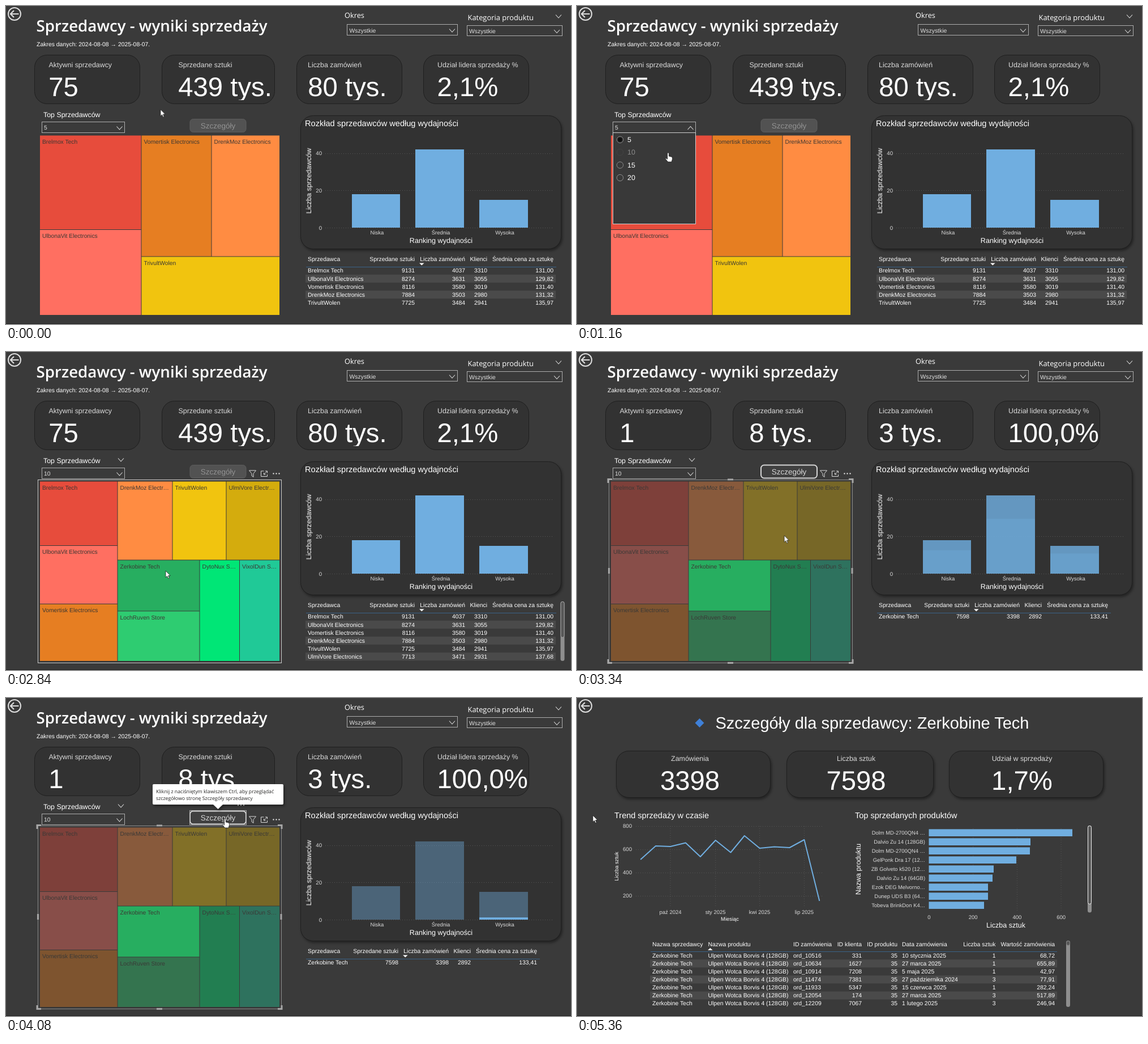
Write an HTML page that moves like this. It is 998 px wide and 561 px high and loops after 5.57 s.

```html
<!DOCTYPE html>
<html lang="pl">
<head>
<meta charset="utf-8">
<title>Sprzedawcy - wyniki sprzedaży</title>
<style>
html, body { margin: 0; width: 100%; height: 100%; overflow: hidden; background: #3a3a3a; }
svg { display: block; width: 998px; height: 561px; font-family: "Liberation Sans", Arial, sans-serif; text-rendering: geometricPrecision; }
.ui { font-family: "Open Sans", "Noto Sans", sans-serif; }
.shadow { filter: drop-shadow(2px 3px 2px rgba(0, 0, 0, .4)); }
.lit { transform-box: fill-box; transform-origin: 50% 100%; }
</style>
</head>
<body>
<script>
const LOOP = 5570;
const BLUE = '#70aee0', SOFT = '#dadada', WHITE = '#fff';

// ---- drawing helpers ----
const text = (x, y, s, size, fill = WHITE, anchor = 'start', extra = '') =>
  `<text x="${x}" y="${y}" font-size="${size}" fill="${fill}" text-anchor="${anchor}" ${extra}>${s}</text>`;
const mid = (x, y, s, size, fill) => text(x, y, s, size, fill, 'middle');
const end = (x, y, s, size, fill) => text(x, y, s, size, fill, 'end');
const upright = (x, y, s, size) =>
  text(0, 0, s, size, WHITE, 'middle', `transform="translate(${x} ${y}) rotate(-90)"`);
const rect = (x, y, w, h, fill, extra = '') =>
  `<rect x="${x}" y="${y}" width="${w}" height="${h}" fill="${fill}" ${extra}/>`;
const frame = (x1, y1, x2, y2, stroke, extra = '') =>
  rect(x1 + .5, y1 + .5, x2 - x1 - 1, y2 - y1 - 1, 'none', `stroke="${stroke}" ${extra}`);
const line = (d, stroke, width = 1, extra = '') =>
  `<path d="${d}" fill="none" stroke="${stroke}" stroke-width="${width}" ${extra}/>`;
const dots = d => line(d, '#565656', 1, 'stroke-dasharray="1 3"');
const group = (id, ...parts) => `<g id="${id}">${parts.join('')}</g>`;
const card = (x1, y1, x2, y2, cls = '') =>
  rect(x1 + .5, y1 + .5, x2 - x1 - 1, y2 - y1 - 1, '#323232', `rx="22" stroke="#1f1f1f" class="${cls}"`);
const chevron = (x, y, up) =>
  line(up ? `M${x - 5} ${y + 3}l5 -5.5l5 5.5` : `M${x - 5} ${y - 2.5}l5 5.5l5 -5.5`, SOFT, 1.1);
const ellipsis = (x, y) => [-5, 0, 5].map(d => `<circle cx="${x + d}" cy="${y}" r="1.2" fill="${SOFT}"/>`).join('');
const tools = (x, y) =>
  line(`M${x - 6} ${y - 5.5}h12l-4.5 5.5v6l-3 -2.2v-3.8z`, SOFT) +
  line(`M${x + 20} ${y - 4.5}h-5v9.5h11v-3.5M${x + 22.5} ${y - 4.5}h3.5v3.5m0 -3.5l-6 6m0 -3v3h3`, SOFT) +
  ellipsis(x + 42, y);
const scroll = (x, y, h, thumb, edge, id = '') =>
  rect(x, y, 7, h, '#8f8f8f', 'rx="3.5"') +
  rect(x + .5, y + .5, 6, thumb, '#575757', `rx="3" stroke="${edge}" id="${id}"`);
const tile = (x, y, x2, y2, fill, name) =>
  rect(x, y, x2 - x, y2 - y, fill) + text(x + 4, y + 14, name, 10.3, '#3c3833');

// cols: [x, anchor, header]
function table(cols, rows, headY, rowY, step, x1, x2) {
  const cells = (vals, y) => vals.map((v, i) => text(cols[i][0], y, v, 10.4, WHITE, cols[i][1])).join('');
  return cells(cols.map(c => c[2]), headY) +
    rows.map((r, i) => (i % 2 ? rect(x1, rowY + i * step - 10.6, x2 - x1, step, '#4a4a4a') : '') +
      cells(r, rowY + i * step)).join('');
}

// ---- seller overview ----
const sellers = [
  ['Brelmox Tech', '9131', '4037', '3310', '131,00'],
  ['UlbonaVit Electronics', '8274', '3631', '3055', '129,82'],
  ['Vomertisk Electronics', '8116', '3580', '3019', '131,40'],
  ['DrenkMoz Electronics', '7884', '3503', '2980', '131,32'],
  ['TrivultWolen', '7725', '3484', '2941', '135,97']
];
const sixth = ['UlmiVore Electronics', '7713', '3471', '2931', '137,68'];
const picked = 'Zerkobine Tech';
const sellerCols = dx => [
  [533, 'start', 'Sprzedawca'], [722 + dx, 'end', 'Sprzedane sztuki'], [811 + dx, 'end', 'Liczba zamówień'],
  [850 + dx, 'end', 'Klienci'], [967 + dx, 'end', 'Średnia cena za sztukę']
];
const sellerTable = (rows, dx) => table(sellerCols(dx), rows, 449.8, 470.4, 14.1, 529, 971) +
  line(`M530 460.5H${972 + dx}`, '#3a6288') +
  `<path d="M${730 + dx} 453.5h8.6l-4.3 4z" fill="${WHITE}"/>`;

const cardX = [[50, 237], [275, 475], [513, 700], [737, 924]];
const labels = ['Aktywni sprzedawcy', 'Sprzedane sztuki', 'Liczba zamówień', 'Udział lidera sprzedaży %'];
const labelX = [75.5, 304.5, 533, 762], valueX = [75.2, 304.2, 533.3, 761.5];
const values = list => `<g clip-path="url(#cut)">${list.map((v, i) => text(valueX[i], 159.3, v, 47.3)).join('')}</g>`;

const bars = [[611, 696, 332, 'Niska', 655.5], [723, 809, 253, 'Średnia', 768], [836, 922, 342, 'Wysoka', 881]];
const barSet = cls => bars.map(([a, b, y]) => rect(a, y, b - a, 391 - y, BLUE, `class="${cls}"`)).join('');

const red = '#e74c3c', coral = '#ff6f61', amber = '#e67e22', peach = '#ff8c42', gold = '#f1c40f';
const topFive = [
  [60, 228.5, 238.5, 394, red, sellers[0][0]], [60, 395, 238.5, 545, coral, sellers[1][0]],
  [239.5, 228.5, 362.5, 441.5, amber, sellers[2][0]], [363.5, 228.5, 483, 441.5, peach, sellers[3][0]],
  [239.5, 442.5, 483, 545, gold, sellers[4][0]]
];
const topTen = [
  [60, 228.5, 196.5, 341, red, sellers[0][0]], [60, 342, 196.5, 444, coral, sellers[1][0]],
  [60, 445, 196.5, 545, amber, sellers[2][0]], [197.5, 228.5, 293.5, 366.5, peach, 'DrenkMoz Electr…'],
  [294.5, 228.5, 388.5, 366.5, gold, sellers[4][0]], [389.5, 228.5, 483, 366.5, '#d4ac0d', 'UlmiVore Electr…'],
  [197.5, 457.5, 341.5, 545, '#2ecc71', 'LochRuven Store'], [342.5, 367.5, 412, 545, '#00e676', 'DytoNux S…'],
  [413, 367.5, 483, 545, '#20c997', 'VixolDun S…']
];
const tiles = list => list.map(t => tile(...t)).join('');

const radio = (y, on) => `<circle cx="76" cy="${y}" r="5.7" fill="${on ? '#242424' : 'none'}" stroke="#8c8c8c"/>` +
  (on ? `<circle cx="76" cy="${y}" r="3.4" fill="#111"/>` : '');
const option = (y, s, on) => radio(y, on) + text(89, y + 4.4, s, 12.4);
const button = (fill, edge, width, ink) =>
  rect(325, 199.5, 99, 23, fill, `rx="5.5" stroke="${edge}" stroke-width="${width}"`) + mid(374.5, 216, 'Szczegóły', 13.5, ink);
const grips = line('M55 231V224.5H62M480 224.5H487V231M487 542V548.5H480M62 548.5H55V542', '#a6a6a6', 3) +
  line('M266 225H276M266 548.5H276M56.5 381V391M486 381V391', '#a6a6a6', 3);

const overview = group('overview',
  text(53.5, 45.3, 'Sprzedawcy - wyniki sprzedaży', 27.7, WHITE, 'start', 'class="ui" font-weight="600"'),
  text(54, 71, 'Zakres danych: 2024-08-08 → 2025-08-07.', 10.45),
  text(598, 21, 'Okres', 12.8, WHITE, 'start', 'class="ui"'),
  text(815.5, 25, 'Kategoria produktu', 12.9, WHITE, 'start', 'class="ui"'),
  frame(602, 32, 798, 52, '#adadad'), text(606.5, 46.5, 'Wszystkie', 10.4, '#e0e0e0'), chevron(788, 43),
  frame(814, 34, 983, 53, '#adadad'), text(818, 48, 'Wszystkie', 10.4, '#e0e0e0'), chevron(973, 44.5),
  chevron(976, 18),
  cardX.map(([a, b], i) => card(a, 86, b, 173) + text(labelX[i], 107.5, labels[i], 12.4, SOFT)).join(''),
  group('allValues', values(['75', '439 tys.', '80 tys.', '2,1%'])),
  group('oneValues', values(['1', '8 tys.', '3 tys.', '100,0%'])),

  text(66, 195.7, 'Top Sprzedawców', 12.4),
  group('slicerMenu', chevron(203, 190)),
  frame(63, 204, 210, 224, '#adadad'),
  group('five', text(67, 218, '5', 10.4, '#e0e0e0')), group('ten', text(67, 218, '10', 10.4, '#e0e0e0')),
  group('arrowDown', chevron(200.5, 215)), group('arrowUp', chevron(200.5, 215, true)),
  group('buttonOff', button('#525252', '#5c5c5c', 1, '#929292')),
  group('buttonOn', button('#404040', '#d6d6d6', 2, '#d6d6d6')),
  group('buttonHover', frame(324, 198, 425, 224, '#a8a8a8'), ellipsis(415, 189)),

  group('mapFive', tiles(topFive)),
  group('mapTen', group('rest', tiles(topTen)), tile(197.5, 367.5, 341.5, 456.5, '#27ae60', picked)),
  group('mapHover', frame(56, 225, 487, 549, '#cdcdcd')),
  group('mapPicked', frame(56, 225, 487, 549, '#8c8c8c'), grips),
  group('mapTools', tools(435.5, 214.5)),
  group('slicerHover', frame(55, 165, 219, 228, '#bdbdbd')),
  group('popup', rect(63.5, 223.5, 146, 161, '#393939', 'stroke="#cfcfcf"'),
    group('options', option(235.8, '5', true), option(280.6, '15'), option(303, '20'),
      group('tenPlain', option(258, '10')),
      group('tenHover', '<circle cx="76" cy="258" r="5.7" fill="none" stroke="#444"/>', text(89, 262.4, '10', 12.4, '#8c8c8c')))),

  card(520, 193, 981, 429, 'shadow'),
  text(528, 212, 'Rozkład sprzedawców według wydajności', 14.6),
  dots('M564 260.5H968M564 325.5H968M564 391.5H968'),
  [[40, 263], [20, 328.7], [0, 394.5]].map(([v, y]) => end(558, y, v, 9.6, SOFT)).join(''),
  group('base', barSet('')), barSet('lit'),
  bars.map(b => mid(b[4], 403, b[3], 9.5, SOFT)).join(''),
  mid(768.5, 418, 'Ranking wydajności', 12.6), upright(539, 308.5, 'Liczba sprzedawców', 12.5),

  group('sellersAll', sellerTable(sellers, 0)),
  group('sellersMore', rect(529, 530.3, 442, 14.1, '#4a4a4a'),
    sixth.map((v, i) => text(sellerCols(0)[i][0], 540.9, v, 10.4, WHITE, sellerCols(0)[i][1])).join(''),
    scroll(979.5, 440, 105, 63, '#a0a0a0')),
  group('sellersOne', sellerTable([[picked, '7598', '3398', '2892', '133,41']], -29)),

  group('tip', '<path d="M261 152h227q2 0 2 2v32q0 2 -2 2h-105l-8.5 8l-8.5 -8h-105q-2 0 -2 -2v-32q0 -2 2 -2z" fill="#fff" class="shadow"/>',
    text(265, 167.5, 'Kliknij z naciśniętym klawiszem Ctrl, aby przeglądać', 8.75, '#252423', 'start', 'class="ui"'),
    text(265, 180, 'szczegółowo stronę Szczegóły sprzedawcy', 8.75, '#252423', 'start', 'class="ui"')));

// ---- seller details ----
const kpis = [[69, 342, 199.5, 'Zamówienia', '3398'], [370, 630, 493, 'Liczba sztuk', '7598'], [657, 930, 786, 'Udział w sprzedaży', '1,7%']];
const trend = [285, 261, 262, 255.5, 280, 251, 272.5, 243, 265, 262.5, 264, 250, 358];
// the time axis is proportional to days since August 2024
const dayX = month => 112.2 + (Date.UTC(2024, 7 + month) - Date.UTC(2024, 7)) / 864e5 * .866;
const months = ['paź 2024', 'sty 2025', 'kwi 2025', 'lip 2025'].map((m, i) => [m, dayX(2 + 3 * i).toFixed(1)]);
const products = [
  ['Dolm MD-2700QN4 …', 875], ['Dalvio Zu 14 (128GB)', 801], ['Dolm MD-2700QN4 …', 800],
  ['GelPonk Dra 17 (12…', 776], ['ZB Golveto k520 (12…', 736], ['Dalvio Zu 14 (64GB)', 734],
  ['Ezok DEG Melvorno…', 726], ['Dunep UDS B3 (64…', 726], ['Tobeva BrinkDon K4…', 719]
];
const orderCols = [
  [133, 'start', 'Nazwa sprzedawcy'], [231.5, 'start', 'Nazwa produktu'], [382, 'start', 'ID zamówienia'],
  [503, 'end', 'ID klienta'], [566, 'end', 'ID produktu'], [574, 'start', 'Data zamówienia'],
  [739.5, 'end', 'Liczba sztuk'], [844, 'end', 'Wartość zamówienia']
];
const orders = [
  ['10516', '331', '10 stycznia 2025', '1', '68,72'], ['10634', '1627', '27 marca 2025', '1', '655,89'],
  ['10914', '7208', '5 maja 2025', '1', '42,97'], ['11474', '7381', '27 października 2024', '3', '77,91'],
  ['11933', '5347', '15 czerwca 2025', '1', '282,24'], ['12054', '174', '27 marca 2025', '3', '517,89'],
  ['12209', '7067', '1 lutego 2025', '3', '246,94']
].map(([id, client, ...more]) => [picked, 'Ulpen Wotca Borvis 4 (128GB)', 'ord_' + id, client, '35', ...more]);

const details = group('details',
  group('heading', '<path d="M216.5 36l8 8l-8 8l-8 -8z" fill="#3f80d8"/>',
    text(244.5, 54, 'Szczegóły dla sprzedawcy: ' + picked, 29)),
  kpis.map(([a, b]) => card(a, 93, b, 176, 'shadow')).join(''),
  group('kpiValues', kpis.map(k => mid(k[2], 110.5, k[3], 12.4, SOFT) + mid(k[2], 161.7, k[4], 47.3)).join('')),
  group('pageHover', frame(49, 86, 938, 549, '#a2a2a2')),

  text(66, 211.5, 'Trend sprzedaży w czasie', 14.5),
  group('trendHover', frame(61, 198, 450, 399, '#9a9a9a'), tools(398, 209)),
  group('trendChart',
    [800, 600, 400, 200].map((v, i) => end(97, 229.4 + i * 41, v, 9.6, SOFT) + dots(`M104 ${226.5 + i * 41}H436`)).join(''),
    months.map(([m, x]) => mid(x, 381, m, 9.5, SOFT) + dots(`M${x} 226V370`)).join(''),
    line('M' + trend.map((y, i) => `${dayX(i).toFixed(1)} ${y}`).join('L'), BLUE, 2, 'stroke-linejoin="round"'),
    mid(270, 393, 'Miesiąc', 9.4), upright(73, 297, 'Liczba sztuk', 9.3)),

  group('productChart',
    text(491, 211.5, 'Top sprzedanych produktów', 14.5),
    [0, 200, 400, 600].map((v, i) => mid(622 + i * 77.7, 390.3, v, 9.5, SOFT) + (i ? dots(`M${622 + i * 77.7} 230V376`) : '')).join(''),
    products.map(([name, x], i) => rect(621.5, 231.4 + i * 16, x - 621.5, 12.6, BLUE) + end(615, 241.2 + i * 16, name, 9.4, SOFT)).join(''),
    mid(757.5, 404.7, 'Liczba sztuk', 12.5), upright(501, 302, 'Nazwa produktu', 12.5),
    scroll(902, 225, 153.5, 138, '#f0f0f0')),

  group('orders', table(orderCols, orders, 438, 457.8, 14.1, 129, 848),
    line('M130 447.5H848', '#3a6288'), `<path d="M231 445h8.6l-4.3 -4z" fill="${WHITE}"/>`,
    scroll(864, 428, 117, 8, '#8a8a8a', 'orderThumb')));

const back = '<circle cx="15" cy="14" r="11" fill="none" stroke="#dcdcdc" stroke-width="2"/>' +
  line('M22.5 14H8.5M14 8L8 14L14 20', '#dcdcdc', 2.2);
const pointer = group('pointer',
  group('arrow', '<path d="M0 0V11.7L2.7 9.3L4.5 13.5L6.4 12.7L4.6 8.6H8.3Z" fill="#fff" stroke="#111" stroke-width=".7"/>'),
  group('hand', '<path d="M-1.3 1.2a1.3 1.3 0 0 1 2.7 0V6l4.3 .9q1.7 .5 1.7 2.2v2.3l-1.4 4.6h-6.3l-4.7 -5.6q1 -1.5 3.7 .8z" fill="#fff" stroke="#111" stroke-width=".7"/>'));

document.body.innerHTML = `<svg viewBox="0 0 998 561">
  <defs><clipPath id="cut"><rect y="110" width="998" height="55.5"/></clipPath></defs>
  ${rect(0, 0, 998, 561, '#3a3a3a')}${overview}${details}${back}${rect(0, 560, 998, 1, '#222')}${pointer}</svg>`;

// ---- motion ----
const start = document.timeline.currentTime;
function play(el, prop, steps, easing = 'linear') {
  const all = [...steps, [LOOP, steps[steps.length - 1][1]]];
  if (all[0][0] > 0) all.unshift([0, all[0][1]]);
  const keys = all.map(([t, v, e]) => ({ offset: t / LOOP, [prop]: v, easing: e || easing }));
  el.animate(keys, { duration: LOOP, iterations: Infinity }).startTime = start;
}
const byId = id => document.getElementById(id);
const fade = (id, ...steps) => play(byId(id), 'opacity', steps);

// times at which each part turns on, off, on ...
const shown = {
  overview: [0, 4340], details: [4370],
  allValues: [0, 3200], oneValues: [3200],
  slicerMenu: [340, 840, 1730], slicerHover: [340, 840],
  five: [0, 1730], ten: [1730], arrowDown: [0, 620, 1730], arrowUp: [620, 1730],
  options: [740], tenPlain: [0, 1000], tenHover: [1000],
  buttonOff: [0, 3200], buttonOn: [3200], buttonHover: [3660],
  mapFive: [0, 1780], mapTen: [1780], mapHover: [1830, 3070], mapPicked: [3070], mapTools: [1830],
  sellersAll: [0, 3200], sellersMore: [1800, 3200], sellersOne: [3200],
  pageHover: [4460, 4640], trendHover: [4490, 4640],
  productChart: [4480], kpiValues: [4630], trendChart: [4650], orders: [4700],
  arrow: [0, 500, 1730, 3660, 4340], hand: [500, 1730, 3660, 4340]
};
for (const [id, times] of Object.entries(shown)) {
  const steps = times.map((t, i) => [t, i % 2 ? 0 : 1]);
  if (times[0] > 0) steps.unshift([0, 0]);
  play(byId(id), 'opacity', steps, 'step-end');
}

fade('popup', [600, 0], [670, 1, 'step-end'], [1730, 1], [1770, 0]);
fade('rest', [3070, 1], [3130, .4]);
fade('tip', [3880, 0], [4070, 1]);
fade('heading', [4510, 0], [4640, 1]);
fade('base', [3260, 1], [3530, .4]);
document.querySelectorAll('.lit').forEach((el, i) => {
  play(el, 'opacity', [[3260, 0], [3530, 1]]);
  play(el, 'transform', [[3260, 'scaleY(1)'], [3530, `scaleY(${i === 2 ? .08 : 0})`]]);
});
play(byId('orderThumb'), 'height', [[0, '39px'], [4850, '18px'], [5110, '12px'], [5360, '8px']], 'step-end');

const path = [
  [0, 274, 182], [130, 274, 182], [560, 202, 212], [740, 202, 212], [1130, 161, 259], [1420, 161, 259],
  [1590, 158, 250], [1730, 158, 250], [1890, 215, 288], [2260, 290, 352], [2560, 286, 393], [2840, 282, 386],
  [3070, 282, 386], [3340, 366, 324], [3610, 394, 234], [3700, 391, 220], [3860, 391, 220], [4000, 387, 213],
  [4290, 387, 213], [4570, 106, 210], [4740, 28, 207]
];
play(byId('pointer'), 'transform', path.map(([t, x, y]) => [t, `translate(${x}px, ${y}px)`]));
</script>
</body>
</html>
```
